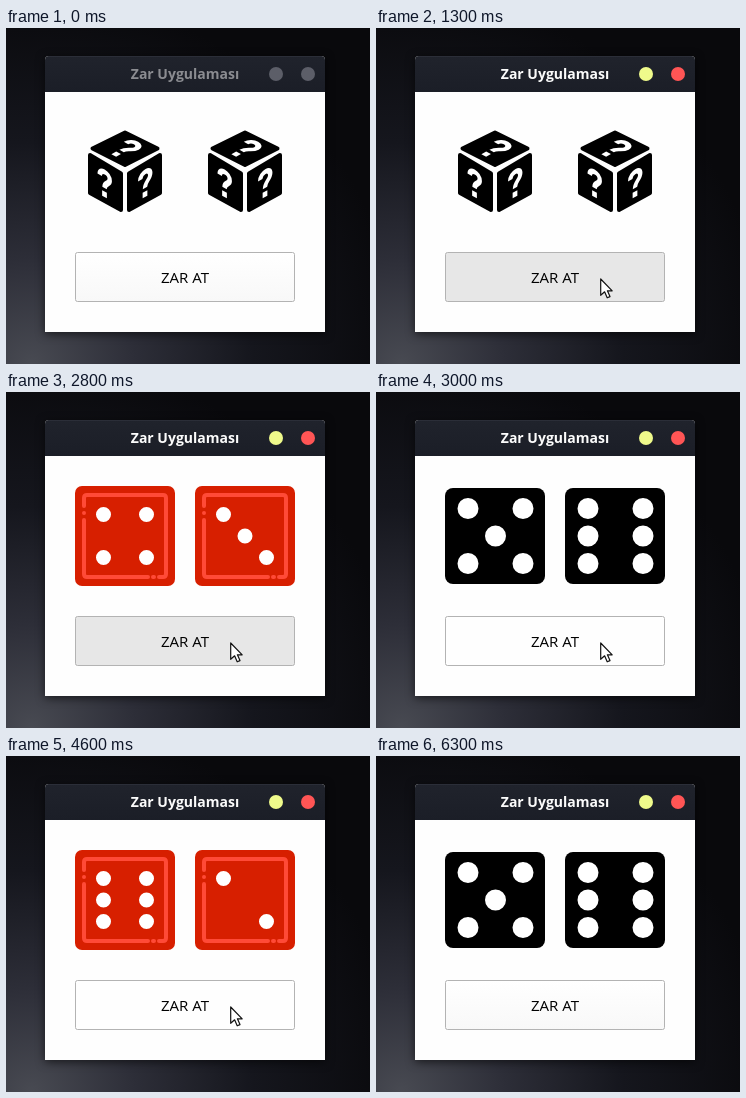
Write an HTML page that moves like this. It is 364 by 336 pixels and loops after 7.8 s.

```html
<!DOCTYPE html>
<html lang="tr">
<head>
<meta charset="utf-8">
<title>Zar Uygulaması</title>
<style>
  html, body { margin: 0; width: 100%; height: 100%; overflow: hidden; background: #0a0a0d; }
  svg { display: block; width: 364px; height: 336px; }
  text { font-family: "Open Sans", "Noto Sans", sans-serif; text-anchor: middle; }
  .shadow { filter: drop-shadow(0 2px 5px rgba(0, 0, 0, .6)); }
  .title { font-size: 14px; font-weight: 700; }
  .label { font-size: 15px; }
  .pips { fill: none; stroke: #fff; stroke-linecap: round; }
  .red .pips { stroke-width: 15; }
  .black .pips { stroke-width: 21; }

  .title, .dot, .dice, .tint, .cursor { animation: 7.8s step-end infinite; }
  .title { animation-name: title; }
  .yellow { animation-name: yellow; }
  .close { animation-name: close; }
  .unknown { animation-name: unknown; }
  .roll1 { animation-name: roll1; }
  .roll2 { animation-name: roll2; }
  .roll3 { animation-name: roll3; }
  .tint { animation-name: tint; }
  .cursor { animation-name: cursor; }

  @keyframes title { 0% { fill: #8b8c91; } 16.66%, 100% { fill: #fbfbfb; } }
  @keyframes yellow { 0% { fill: #5c5e68; } 16.66%, 100% { fill: #effa8b; } }
  @keyframes close { 0% { fill: #5c5e68; } 16.66%, 100% { fill: #ff5555; } }

  @keyframes unknown { 0% { visibility: visible; } 17.94%, 100% { visibility: hidden; } }
  @keyframes roll1 {
    0%, 37.17%, 100% { visibility: hidden; }
    17.94% { visibility: visible; }
  }
  @keyframes roll2 {
    0%, 57.69% { visibility: hidden; }
    37.17%, 76.92%, 100% { visibility: visible; }
  }
  @keyframes roll3 {
    0%, 76.92%, 100% { visibility: hidden; }
    57.69% { visibility: visible; }
  }

  /* idle, hover, pressed, easing back to hover */
  @keyframes tint {
    0%, 79.48%, 100% { fill: transparent; }
    5.12%, 19.23%, 38.46%, 58.97%, 78.2% { fill: #fefefe; }
    16.66%, 35.89%, 56.41%, 75.64% { fill: #e7e7e7; }
    17.94%, 37.17%, 57.69%, 76.92% { fill: #f3f3f3; }
  }

  @keyframes cursor {
    0% { visibility: hidden; transform: translate(336px, 255px); }
    2.56% { visibility: visible; transform: translate(336px, 255px); }
    3.84% { visibility: visible; transform: translate(310px, 254px); }
    5.12% { visibility: visible; transform: translate(275px, 253px); }
    6.41% { visibility: visible; transform: translate(248px, 252px); }
    7.69% { visibility: visible; transform: translate(232px, 251px); }
    8.97% { visibility: visible; transform: translate(225px, 251px); }
    11.53% { visibility: visible; transform: translate(224px, 250px); }
    79.48% { visibility: visible; transform: translate(228px, 246px); }
    80.76%, 100% { visibility: hidden; transform: translate(228px, 246px); }
  }
</style>
</head>
<body>
<svg viewBox="0 0 364 336">
  <defs>
    <radialGradient id="wall" gradientUnits="userSpaceOnUse" cx="25" cy="336" r="370">
      <stop offset="0" stop-color="#484a52"/>
      <stop offset=".28" stop-color="#2d2e38"/>
      <stop offset=".6" stop-color="#15161d"/>
      <stop offset="1" stop-color="#09090c"/>
    </radialGradient>
    <linearGradient id="bar" x2="0" y2="1">
      <stop offset="0" stop-color="#20232c"/>
      <stop offset="1" stop-color="#1b1e27"/>
    </linearGradient>
    <linearGradient id="face" x2="0" y2="1">
      <stop offset="0" stop-color="#fff"/>
      <stop offset="1" stop-color="#f8f8f8"/>
    </linearGradient>

    <g id="mark">
      <path d="M-5.5 -5.5C-5.5 -13 6 -13 6 -6C6 -1 0 -1 0 5" fill="none" stroke="#fff" stroke-width="5"/>
      <path d="M-2.7 8.5h5.4v5.5h-5.4z" fill="#fff"/>
    </g>
    <g id="cube">
      <g stroke="#000" stroke-width="4" stroke-linejoin="round">
        <path d="M50 10.5L82.5 26.5L50 43L17.5 26.5Z"/>
        <path d="M15 33L46 51.5V88L15 71Z"/>
        <path d="M85 33L54 51.5V88L85 71Z"/>
      </g>
      <use href="#mark" transform="matrix(.875 .5 0 1 29.5 61)"/>
      <use href="#mark" transform="matrix(.875 -.5 0 1 70 61)"/>
      <use href="#mark" transform="matrix(.875 .5 -.875 .5 51 26.5)"/>
    </g>

    <g id="redDie">
      <rect width="100" height="100" rx="7" fill="#d71f00"/>
      <path d="M9 20V12q0-3 3-3H88q3 0 3 3V88q0 3-3 3H84M79 91h-1M73 91H12q-3 0-3-3V34M9 27h0"
        fill="none" stroke="#ff4a37" stroke-width="4" stroke-linecap="round"/>
    </g>
    <rect id="blackDie" y="2" width="100" height="96" rx="8"/>
  </defs>

  <rect width="364" height="336" fill="url(#wall)"/>

  <g class="shadow">
    <path d="M39 304V32q0-4 4-4H315q4 0 4 4V304Z" fill="#fefefe"/>
    <path d="M39 64V32q0-4 4-4H315q4 0 4 4V64Z" fill="url(#bar)"/>
  </g>
  <path d="M43 28.5H315" stroke="#2b2e38"/>
  <text class="title" x="179" y="51">Zar Uygulaması</text>
  <circle class="dot yellow" cx="270" cy="46" r="7"/>
  <circle class="dot close" cx="302" cy="46" r="7"/>

  <g class="dice unknown">
    <use href="#cube" x="69" y="94"/>
    <use href="#cube" x="189" y="94"/>
  </g>

  <g class="dice red roll1">
    <g transform="translate(69 94)">
      <use href="#redDie"/>
      <path class="pips" d="M28.5 28.5h0M71.5 28.5h0M28.5 71.5h0M71.5 71.5h0"/>
    </g>
    <g transform="translate(189 94)">
      <use href="#redDie"/>
      <path class="pips" d="M28.5 28.5h0M50 50h0M71.5 71.5h0"/>
    </g>
  </g>

  <g class="dice black roll2">
    <g transform="translate(69 94)">
      <use href="#blackDie"/>
      <path class="pips" d="M23 22.5h0M78 22.5h0M50.5 50h0M23 77.5h0M78 77.5h0"/>
    </g>
    <g transform="translate(189 94)">
      <use href="#blackDie"/>
      <path class="pips" d="M23 22.5h0M78 22.5h0M23 50h0M78 50h0M23 77.5h0M78 77.5h0"/>
    </g>
  </g>

  <g class="dice red roll3">
    <g transform="translate(69 94)">
      <use href="#redDie"/>
      <path class="pips" d="M28.5 28.5h0M71.5 28.5h0M28.5 50h0M71.5 50h0M28.5 71.5h0M71.5 71.5h0"/>
    </g>
    <g transform="translate(189 94)">
      <use href="#redDie"/>
      <path class="pips" d="M28.5 28.5h0M71.5 71.5h0"/>
    </g>
  </g>

  <rect x="69.5" y="224.5" width="219" height="49" rx="2" fill="url(#face)"/>
  <rect class="tint" x="69.5" y="224.5" width="219" height="49" rx="2" stroke="#b3b3b3"/>
  <text class="label" x="179" y="255">ZAR AT</text>

  <path class="cursor" d="M.7 1V17.3L4.6 13.8L7.2 19.8L10 18.6L7.4 12.8H12.2Z"
    fill="#fff" stroke="#111" stroke-width="1.2" stroke-linejoin="round"/>
</svg>
</body>
</html>
```
